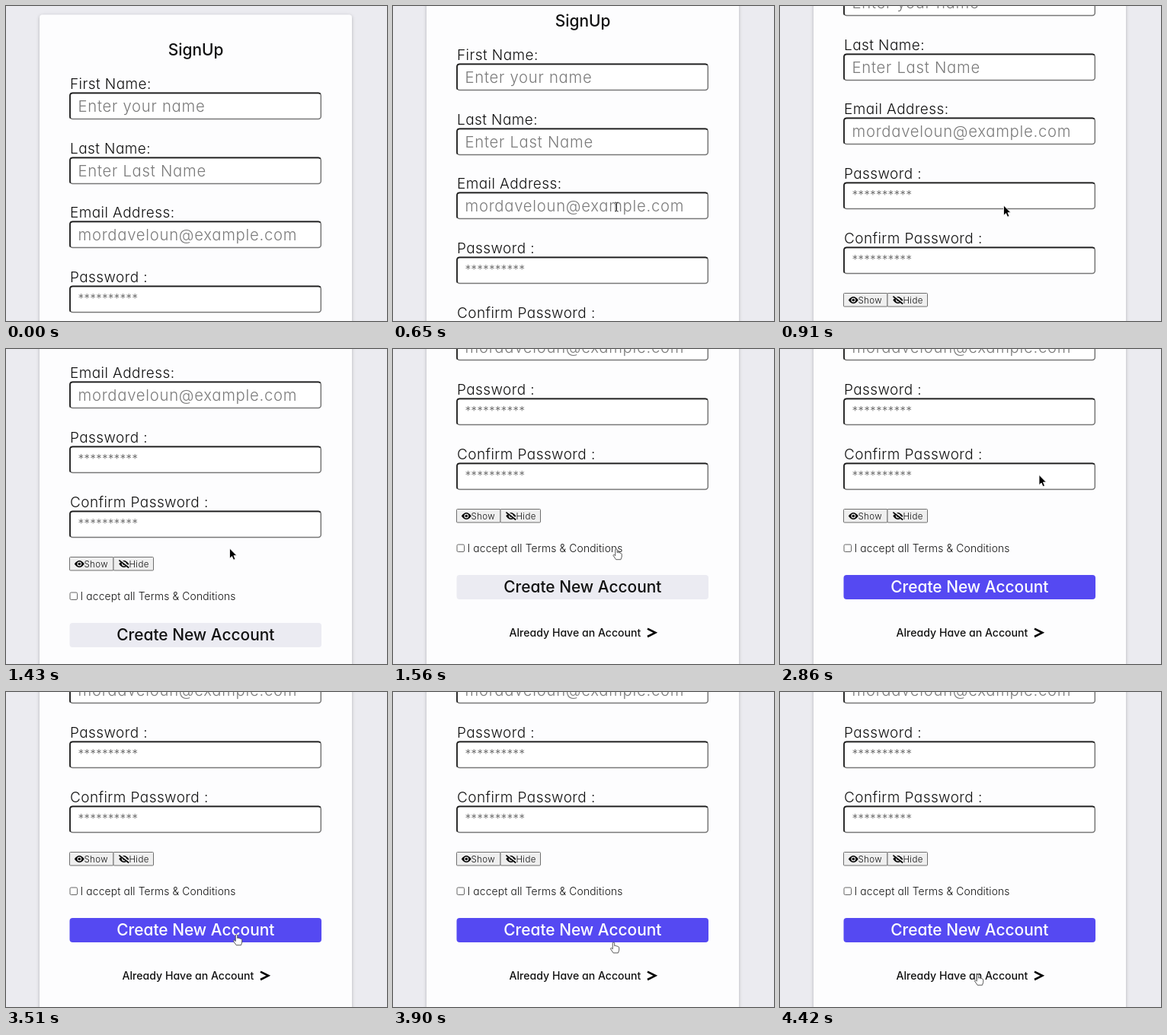
An HTML page that plays this animation: 500x414 px, repeating every 4810 ms.

```html
<!DOCTYPE html>
<html lang="en">
<head>
<meta charset="utf-8">
<title>SignUp form</title>
<style>
  html, body { margin: 0; width: 100%; height: 100%; overflow: hidden; background: #ebebf0; }
  svg { display: block; width: 100vw; height: 100vh; }
  text { font-family: Inter, "Open Sans", sans-serif; font-feature-settings: "cv11"; font-weight: 260; fill: #111; }
  .label { font-size: 19px; letter-spacing: .42px; }
  .hint { font-size: 20.3px; letter-spacing: .72px; fill: #7b7b7b; }
  .stars { font-size: 15.7px; fill: #666; }
  .small { font-size: 11.5px; letter-spacing: .35px; }
  .terms { font-size: 13.8px; letter-spacing: .16px; }
  .title { font-size: 20.9px; font-weight: 480; text-anchor: middle; }
  .link { font-size: 14.1px; font-weight: 480; }
  .edge { fill: #fff; stroke: #777; stroke-width: 1.5; }
  .inset { fill: none; stroke: #1c1c1c; stroke-width: 1.7; }
  .btn { fill: #efefef; stroke: #6f6f6f; }
</style>
</head>
<body>
<svg viewBox="0 0 500 414" preserveAspectRatio="none">
  <defs>
    <filter id="shadow" x="-10%" y="-10%" width="120%" height="120%">
      <feDropShadow dx="0" dy="1" stdDeviation="2.2" flood-color="#000" flood-opacity=".25"/>
    </filter>
    <g id="eye">
      <path d="M-6.5 0Q0-9 6.5 0Q0 9-6.5 0Z"/>
      <circle r="2.9" fill="#efefef"/>
      <circle r="1.8"/>
    </g>
  </defs>
  <rect width="500" height="414" fill="#ebebf0"/>
  <g id="page">
    <rect x="44" y="11.5" width="410" height="900" rx="4" fill="#fdfdfe" filter="url(#shadow)"/>
    <text class="title" x="249" y="65">SignUp</text>
    <g id="fields"></g>
    <rect class="btn" x="83.5" y="513.5" width="57.5" height="17.5" rx="1"/>
    <rect class="btn" x="141" y="513.5" width="52.5" height="17.5" rx="1"/>
    <use href="#eye" x="96.3" y="522.5"/>
    <use href="#eye" x="154.8" y="522.5"/>
    <path d="M149 517.2l12.6 9.8" stroke="#efefef" stroke-width="3.4"/>
    <path d="M148.4 517.6l12.8 9.9" stroke="#000" stroke-width="1.6"/>
    <text class="small" x="102.5" y="526.6">Show</text>
    <text class="small" x="161.5" y="526.6">Hide</text>
    <rect x="84" y="560" width="9.5" height="9.5" rx="1.5" fill="#fff" stroke="#666"/>
    <text class="terms" x="97.5" y="570">I accept all Terms &amp; Conditions</text>
    <rect id="submit" x="83.5" y="600" width="330.5" height="32" rx="4"/>
    <text id="submitText" class="title" x="248.8" y="623.3">Create New Account</text>
    <text class="link" x="152.5" y="681">Already Have an Account</text>
    <path d="M334 670.6L344.3 675.8L334 681" fill="none" stroke="#000" stroke-width="2.6"/>
  </g>
  <g id="cursor">
    <path id="arrow" d="M0 0V13.2L3 10.5L5.1 15.2L7.4 14.2L5.4 9.6H9.4Z" fill="#000" stroke="#fff" stroke-width=".8"/>
    <path id="hand" transform="translate(-.6 1) scale(.88)" d="M-1.3 1C-1.3-.6 1.4-.6 1.5 1V5.2C2.3 4.4 3.8 4.6 4.1 5.6C5 5 6.2 5.4 6.4 6.4C7.4 6 8.3 6.7 8.3 7.8V11.4L6.9 15.6H-.3L-4.4 9.6C-4.6 8-3 7.8-1.3 9.8Z" fill="#fff" stroke="#444"/>
    <path id="beam" d="M-2.2-5.5Q0-5.5 0-4Q0-5.5 2.2-5.5M0-4V5M-2.2 6.5Q0 6.5 0 5Q0 6.5 2.2 6.5" fill="none" stroke="#222"/>
  </g>
</svg>
<script>
const LOOP = 4810, STEP = 130, PITCH = 84.67;
const el = id => document.getElementById(id);

const fields = [
  ["First Name:", "Enter your name"],
  ["Last Name:", "Enter Last Name"],
  ["Email Address:", "mordaveloun@example.com"],
  ["Password :", "**********"],
  ["Confirm Password :", "**********"]
];

el("fields").innerHTML = fields.map(([label, hint], i) => {
  const stars = hint[0] === "*";
  return `<g transform="translate(0 ${Math.round(i * PITCH)})">
    <text class="label" x="84" y="109">${label}</text>
    <rect class="edge" x="84" y="114.4" width="329.3" height="34.1" rx="3.5"/>
    <path class="inset" d="M84.6 147.6Q84 147 84 145V117.9Q84 114.4 87.5 114.4H410Q412 114.4 412.8 115.6"/>
    <text class="${stars ? "stars" : "hint"}" x="94.5" y="${stars ? 135.5 : 138.8}">${hint}</text>
  </g>`;
}).join("");

// [time, page scroll]
const scrolls = [[0, 0], [650, 38], [780, 88], [910, 136], [1040, 168], [1430, 240], [1560, 303]];

// [time, x, y] of the pointer tip
const moves = [
  [650, 293.5, 262], [2340, 293.5, 262], [2600, 300, 308], [2860, 340, 165.5],
  [2990, 342, 161], [3510, 303, 318], [3640, 302, 317], [4290, 272, 345], [4420, 260, 370.5]
];

const lastBefore = (keys, t) => keys.filter(k => k[0] <= t).pop();

function pointerAt(t) {
  const a = lastBefore(moves, t);
  if (!a) return null;
  const b = moves[moves.indexOf(a) + 1] || a;
  const k = b === a ? 0 : (t - a[0]) / (b[0] - a[0]);
  return [1, 2].map(i => a[i] + (b[i] - a[i]) * k);
}

function shapeAt(t, y) {
  if (t < 780) return "beam";
  if (t < 1560) return "arrow";
  const clickable = [[256, 270], [297, 329], [365, 382]];
  const onLink = clickable.some(([top, bottom]) => y >= top && y <= bottom);
  return onLink && !(t > 2600 && y < 290) ? "hand" : "arrow";
}

function draw(time) {
  const t = Math.floor((time % LOOP) / STEP) * STEP;
  el("page").setAttribute("transform", `translate(0 ${-lastBefore(scrolls, t)[1]})`);

  const active = t >= 2600;
  el("submit").style.fill = active ? "#5549f2" : "#ebebf2";
  el("submitText").style.fill = active ? "#fff" : "#111";

  const p = pointerAt(t);
  el("cursor").style.display = p ? "" : "none";
  if (p) {
    const shape = shapeAt(t, p[1]);
    for (const id of ["arrow", "hand", "beam"]) el(id).style.display = id === shape ? "" : "none";
    el("cursor").setAttribute("transform", `translate(${p[0]} ${p[1] + (shape === "beam" ? 1.5 : 0)})`);
  }
}

const start = performance.now();
function tick() {
  draw(performance.now() - start);
  requestAnimationFrame(tick);
}
tick();
</script>
</body>
</html>
```
